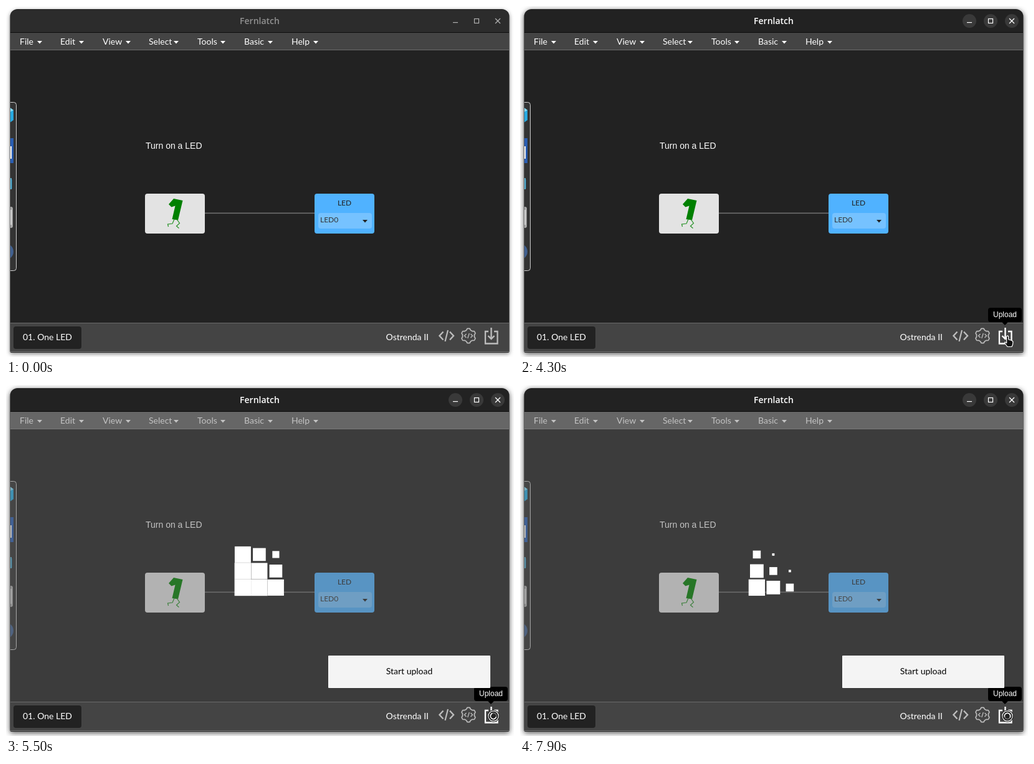
These frames come from a looping animation (815 px wide and 563 px high, 8000 ms). An HTML page with a canvas:

```html
<!DOCTYPE html>
<html lang="en">
<head>
<meta charset="utf-8">
<title>Block editor</title>
<style>
  html, body { margin: 0; width: 100%; height: 100%; overflow: hidden; background: #fff; }
  canvas { display: block; }
</style>
</head>
<body>
<canvas id="stage" width="815" height="563"></canvas>
<script>
const ctx = document.getElementById('stage').getContext('2d');
const LOOP = 8000, STEP = 100;
const FOCUS = 4300, BUSY = 4445, HOVER = 3200;
const LATO = 'Lato, sans-serif', SANS = '"Liberation Sans", Arial, sans-serif';

const clamp = v => Math.max(0, Math.min(1, v));

function bezier(x1, y1, x2, y2) {
  const at = (a, b, s) => 3 * (1 - s) ** 2 * s * a + 3 * (1 - s) * s * s * b + s ** 3;
  return x => {
    if (x <= 0) return 0;
    if (x >= 1) return 1;
    let lo = 0, hi = 1;
    for (let i = 0; i < 24; i++) {
      const mid = (lo + hi) / 2;
      if (at(x1, x2, mid) < x) lo = mid; else hi = mid;
    }
    return at(y1, y2, lo);
  };
}
const easeInOut = bezier(.42, 0, .58, 1);
const easeOut = bezier(.2, .5, .6, 1);
const easeBack = bezier(.175, .885, .32, 1.275);

function rect(x, y, w, h, color) {
  ctx.fillStyle = color;
  ctx.fillRect(x, y, w, h);
}
function round(x, y, w, h, r, color) {
  ctx.beginPath();
  ctx.roundRect(x, y, w, h, r);
  ctx.fillStyle = color;
  ctx.fill();
}
function disc(x, y, r, color) {
  ctx.beginPath();
  ctx.arc(x, y, r, 0, 7);
  ctx.fillStyle = color;
  ctx.fill();
}
function path(points, closed) {
  ctx.beginPath();
  points.forEach(([x, y]) => ctx.lineTo(x, y));
  if (closed) ctx.closePath();
}
function line(points, color, width) {
  path(points);
  ctx.strokeStyle = color;
  ctx.lineWidth = width;
  ctx.stroke();
}
function shape(points, color) {
  path(points, true);
  ctx.fillStyle = color;
  ctx.fill();
}
function text(str, x, y, font, color, align = 'left') {
  ctx.font = font;
  ctx.textAlign = align;
  ctx.fillStyle = color;
  ctx.fillText(str, x, y);
}
function caret(x, y, color) {
  shape([[x - 4, y], [x + 4, y], [x, y + 4.5]], color);
}

function drawFrame(focused) {
  rect(0, 0, 815, 563, '#fff');
  ctx.save();
  ctx.shadowColor = focused ? 'rgba(0,0,0,.7)' : 'rgba(0,0,0,.5)';
  ctx.shadowBlur = focused ? 9 : 6;
  ctx.shadowOffsetY = 2;
  round(6.5, 5, 801, 551, [12, 12, 2, 2], '#222');
  ctx.restore();

  round(7, 6, 800, 37, [11, 11, 0, 0], focused ? '#222' : '#2c2c2c');
  rect(7, 42, 800, 1, '#0c0c0c');
  const ink = focused ? '#fff' : '#919191';
  text('Fernlatch', 407, 29, '600 14px "Open Sans", sans-serif', ink, 'center');
  if (focused) for (const x of [721, 755, 789]) disc(x, 24, 11, '#393939');
  const mark = focused ? '#fff' : '#b0b0b0';
  line([[717, 26.5], [725, 26.5]], mark, 1.2);
  ctx.strokeRect(751.5, 20.5, 7, 7);
  line([[785, 20], [793, 28]], mark, 1.2);
  line([[785, 28], [793, 20]], mark, 1.2);
}

function drawMenu() {
  rect(7, 43, 800, 28, '#444');
  rect(7, 70, 800, 1, '#6c6c6c');
  const items = [['File', 22, 54], ['Edit', 87, 121], ['View', 155, 196], ['Select', 229, 273],
                 ['Tools', 307, 348], ['Basic', 382, 424], ['Help', 458, 497]];
  for (const [name, x, arrow] of items) {
    text(name, x, 62, '14px ' + LATO, '#fff');
    caret(arrow, 56, '#fff');
  }
}

function drawToolbox() {
  ctx.save();
  ctx.beginPath();
  ctx.rect(7, 150, 12, 280);
  ctx.clip();
  round(0, 154.5, 16.5, 270, 4, '#333');
  ctx.strokeStyle = '#d0d0d0';
  ctx.lineWidth = 1;
  ctx.stroke();
  shape([[5, 162], [12, 167], [12, 183], [5, 188]], '#27a9e0');
  shape([[5, 162], [12, 167], [5, 171]], '#8bdcf8');
  rect(7, 212, 5, 40, '#2a5db0');
  rect(6, 225, 3, 20, '#fff');
  rect(7, 276, 2, 18, '#5fb4d4');
  rect(9, 278, 1, 15, '#28607a');
  round(2, 322, 9, 34, 3, '#a8a8a8');
  rect(7, 327, 2, 24, '#d8d8d8');
  disc(-1, 394, 13, '#41608f');
  ctx.restore();
}

function drawCircuit() {
  rect(7, 71, 800, 437, '#222');
  drawToolbox();
  text('Turn on a LED', 224, 229, '14px ' + SANS, '#fff');
  rect(319, 331.5, 176, 1.6, '#6f6f6f');

  round(223, 301, 96, 64, 4, '#e3e3e3');
  shape([[269, 309], [283.5, 312], [276, 343.5], [266.5, 342], [271.5, 320.5], [265.5, 322.5], [261, 318]], '#008000');
  line([[270, 342], [267, 349], [259.5, 350], [260.5, 354]], '#269226', 1.2);
  line([[274, 342], [278.5, 348.5], [273.5, 353], [277.5, 356.5]], '#269226', 1.2);

  round(495, 301, 96, 64, 4, '#50b2ff');
  text('LED', 543, 320, '12px ' + LATO, '#222', 'center');
  round(501, 332, 86, 25, 4, '#76c2ff');
  text('LED0', 504, 347, '12px ' + LATO, '#333');
  caret(576, 343, '#222');
}

function drawFooter(hover) {
  rect(7, 508, 800, 47, '#444');
  rect(7, 508, 800, 1, '#6a6a6a');
  rect(7, 554, 800, 1, '#777');
  round(12, 514, 109, 36, 4, '#222');
  text('01. One LED', 27, 536, '14px ' + LATO, '#fff');
  text('Ostrenda II', 678, 536, '14px ' + LATO, '#fff', 'right');

  const grey = '#bcbcbc';
  line([[701.5, 522.5], [695.5, 529], [701.5, 535.5]], grey, 2.4);
  line([[712, 522.5], [718, 529], [712, 535.5]], grey, 2.4);
  line([[709, 520], [704.5, 538]], grey, 2.2);

  const gear = [];
  for (let i = 0; i < 72; i++) {
    const a = i * Math.PI / 36, r = 10.6 + 1.1 * Math.tanh(3 * Math.cos(6 * a));
    gear.push([742 + r * Math.sin(a), 529 - r * Math.cos(a)]);
  }
  path(gear, true);
  ctx.strokeStyle = grey;
  ctx.lineWidth = 1.7;
  ctx.stroke();
  line([[738.5, 526], [735.5, 529], [738.5, 532]], grey, 1.4);
  line([[745.5, 526], [748.5, 529], [745.5, 532]], grey, 1.4);
  line([[743.3, 525], [740.7, 533]], grey, 1.3);

  const tray = hover ? '#fff' : grey;
  line([[774, 522], [769, 522], [769, 541.5], [788.5, 541.5], [788.5, 522], [783, 522]], tray, 2.3);
  line([[778.5, 516], [778.5, 533]], tray, 2.4);
  line([[773.5, 529], [778.5, 534], [783.5, 529]], tray, 2.4);
}

function drawTooltip(alpha) {
  ctx.globalAlpha = alpha;
  round(751, 484, 54, 23, 4, '#000');
  shape([[773, 507], [783, 507], [778, 512]], '#000');
  text('Upload', 778, 499, '12px ' + SANS, '#fff', 'center');
  ctx.globalAlpha = 1;
}

// 3x3 grid of cubes that shrink and grow in a diagonal wave
function drawCubes(t) {
  const seconds = (t - BUSY) * 1.006 / 1000;
  for (let i = 0; i < 9; i++) {
    const col = i % 3, row = Math.floor(i / 3);
    const phase = seconds - .1 * (2 - row + col);
    const p = phase < 0 ? 0 : phase % 1.3 / 1.3;
    const scale = p < .35 ? 1 - easeInOut(p / .35) : easeInOut((p - .35) / .35);
    const size = 26.6 * scale;
    rect(379.9 + 26.5 * col - size / 2, 271.9 + 26.5 * row - size / 2, size, size, '#fff');
  }
}

function drawNotice(t) {
  const k = easeBack((t - BUSY - 8) / 500);
  const x = Math.round(1127 - 610 * k), y = k > 1 ? 433 : 434;
  round(x, y, 260, 486 - y, 1, '#fff');
  rect(x + 1, y + 1, 258, 484 - y, '#f4f4f4');
  text('Start upload', x + 130, y + 30, '14px ' + LATO, '#000', 'center');
}

const track = [[500, 106, 1], [1200, 153, 18], [1300, 153, 18], [1400, 149, 17],
               [2200, 730, 382], [3000, 777, 503], [3100, 778, 512], [3500, 782, 529]];

function pointerAt(t) {
  const i = track.findIndex(k => k[0] > t);
  if (i < 0) return track[track.length - 1].slice(1);
  const [t0, x0, y0] = track[i - 1], [t1, x1, y1] = track[i];
  const ease = t0 === 1400 ? easeInOut : easeOut;
  const k = ease((t - t0) / (t1 - t0));
  return [x0 + (x1 - x0) * k, y0 + (y1 - y0) * k];
}

const ARROW = [[.5, .5], [.5, 16], [4, 12.8], [6.5, 18.3], [9, 17.2], [6.6, 11.8], [11, 11.4]];
const HAND = [[-1.5, 1], [0, 0], [1.5, 1], [1.8, 6], [7, 7.5], [9, 9.5], [8.5, 14], [7, 17.5],
              [0, 17.5], [-4.5, 11.5], [-4, 10], [-1.3, 11.5]];

function drawPointer(t) {
  if (t < track[0][0]) return;
  const [x, y] = pointerAt(t);
  ctx.save();
  if (t >= BUSY) {
    ctx.translate(782, 531);
    disc(0, 0, 9.8, '#222');
    disc(0, 0, 8.7, '#fff');
    disc(0, 0, 7.6, '#222');
    ctx.rotate((t - BUSY) / 1000 * Math.PI * 2);
    ctx.lineWidth = 1.6;
    for (const [from, to, color] of [[0, 6.3, '#777'], [0, 4, '#fff']]) {
      ctx.beginPath();
      ctx.arc(0, 0, 4.7, from, to);
      ctx.strokeStyle = color;
      ctx.stroke();
    }
  } else {
    ctx.translate(Math.round(x), Math.round(y));
    ctx.lineJoin = 'round';
    path(t < HOVER ? ARROW : HAND, true);
    ctx.fillStyle = '#111';
    ctx.fill();
    ctx.strokeStyle = '#fff';
    ctx.lineWidth = 1.2;
    ctx.stroke();
  }
  ctx.restore();
}

function draw(t) {
  const busy = t >= BUSY, hover = t >= HOVER;
  drawFrame(t >= FOCUS);
  drawMenu();
  drawCircuit();
  if (busy) {
    rect(7, 43, 800, 28, 'rgba(136,136,136,.5)');
    rect(7, 71, 800, 437, 'rgba(100,100,100,.39)');
  }
  drawFooter(hover);
  if (hover) drawTooltip(clamp((t - HOVER + 50) / 150));
  if (busy) {
    drawCubes(t);
    ctx.save();
    ctx.beginPath();
    ctx.rect(7, 43, 800, 512);
    ctx.clip();
    drawNotice(t);
    ctx.restore();
  }
  drawPointer(t);
}

function tick() {
  draw(Math.floor(performance.now() % LOOP / STEP) * STEP);
  requestAnimationFrame(tick);
}
tick();
</script>
</body>
</html>
```
